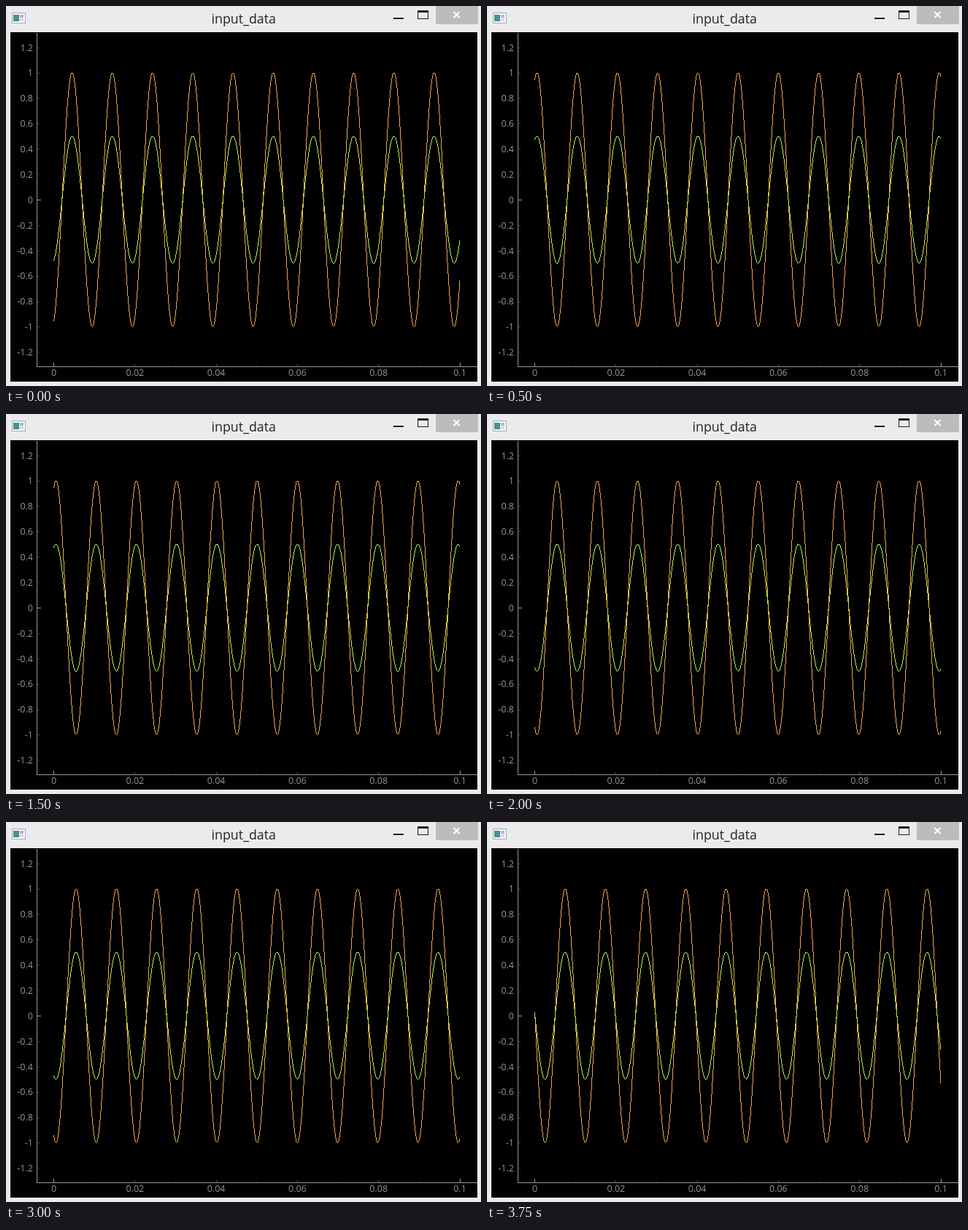
Recreate the animation shown at these times as an HTML page. Size 651 by 522 pixels, loop 4000 ms.

```html
<!DOCTYPE html>
<html lang="en">
<head>
<meta charset="utf-8">
<title>input_data</title>
<style>
  html, body { margin: 0; width: 100%; height: 100%; overflow: hidden; background: #ebebeb; }
  svg { display: block; width: 651px; height: 522px; }
  text { font-family: "Open Sans", "Noto Sans", sans-serif; }
  .title { font-size: 17.8px; fill: #222; text-anchor: middle; }
  #axes text { font-size: 12.5px; fill: #969696; }
  #axes line { stroke: #969696; }
  .wave { fill: none; stroke-width: 1; }
</style>
</head>
<body>
<svg viewBox="0 0 651 522">
  <defs>
    <linearGradient id="lime" gradientUnits="userSpaceOnUse" x1="0" y1="179" x2="0" y2="354">
      <stop offset="0" stop-color="#a8f25c"/>
      <stop offset=".35" stop-color="#cfe63c"/>
      <stop offset=".5" stop-color="#dbe034"/>
      <stop offset=".65" stop-color="#cfe63c"/>
      <stop offset="1" stop-color="#a8f25c"/>
    </linearGradient>
  </defs>
  <rect width="651" height="522" fill="#ebebeb"/>

  <g id="icon">
    <rect x="8.5" y="9.5" width="18" height="14" fill="#f6f8f9" stroke="#a3abb0"/>
    <rect x="10" y="12" width="8" height="9" fill="#4a908e"/>
    <rect x="19" y="12" width="5" height="4" fill="#a9bccb"/>
    <rect x="19" y="17" width="5" height="4" fill="#d3dae0"/>
  </g>
  <text class="title" x="325.7" y="24">input_data</text>
  <g id="buttons">
    <rect x="531" y="16" width="14" height="2" fill="#1c1c1c"/>
    <path d="M564 6h15v12h-15zM565 9v8h13v-8z" fill="#1c1c1c" fill-rule="evenodd"/>
    <rect x="589" width="58" height="25" fill="#bcbcbc"/>
    <path d="M613.5 8l8 8M621.5 8l-8 8" stroke="#fff" stroke-width="2"/>
  </g>

  <rect x="6" y="36" width="640" height="480" fill="#000"/>
  <g id="axes" shape-rendering="crispEdges"></g>
  <g shape-rendering="crispEdges">
    <path id="full" class="wave" stroke="#eaa650"/>
    <path id="half" class="wave" stroke="url(#lime)"/>
  </g>
</svg>
<script>
const $ = id => document.getElementById(id);
const X0 = 65.5, SPAN = 556.5, Y0 = 266.5, UNIT = 174.4;
const CYCLES = 10.095, LOOP = 4000, STEP = 250;

function add(tag, attrs, text) {
  const el = document.createElementNS($('axes').namespaceURI, tag);
  for (const key in attrs) el.setAttribute(key, attrs[key]);
  if (text) el.textContent = text;
  $('axes').append(el);
}

const line = (x1, y1, x2, y2, opacity = 1) =>
  add('line', { x1, y1, x2, y2, 'stroke-opacity': opacity });
const snap = v => Math.floor(v) + 0.5;

// Tick length and strength fall with the level: 0 is coarsest.
const tickLength = level => 5 / (1 + level / 2);
const tickAlpha = level => 1 / (level + 1);

function drawAxes() {
  line(42.5, 37, 42.5, 496);
  line(42, 495.5, 646, 495.5);
  for (let i = -6; i <= 6; i++) {
    const y = Y0 - i * UNIT / 5;
    const level = i === 0 ? 0 : i % 5 === 0 ? 1 : 2;
    line(43, snap(y), 43 + tickLength(level), snap(y), tickAlpha(level));
    add('text', { x: 37, y: y + 4.3, 'text-anchor': 'end' }, String(i / 5));
  }
  for (let i = 0; i <= 10; i++) {
    const x = X0 + i * SPAN / 10;
    const level = i % 10 === 0 ? 0 : i % 2 === 0 ? 1 : 2;
    line(snap(x), 495, snap(x), 495 - tickLength(level), tickAlpha(level));
    if (level < 2) add('text', { x, y: 508.3, 'text-anchor': 'middle' }, String(i / 100));
  }
}

// A hairline without smoothing: one vertical run of whole pixels per column.
function wave(amp, phase) {
  const rowAt = x => {
    const u = Math.min(1, Math.max(0, (x - X0) / SPAN));
    return Math.floor(Y0 - UNIT * amp * Math.cos(2 * Math.PI * (CYCLES * u - phase)));
  };
  let d = '';
  for (let x = Math.floor(X0); x < X0 + SPAN; x++) {
    const from = rowAt(x), to = rowAt(x + 1);
    d += `M${x + 0.5} ${from}V${to === from ? from + 1 : to}`;
  }
  return d;
}

// Each refresh shows a new block of samples, its phase held to tenths of a cycle.
const phaseAt = n => Math.floor(7.53 * (n - 2)) / 10 + 0.055;

let shown = -1;
function render(time) {
  const n = Math.floor((time % LOOP) / STEP);
  if (n === shown) return;
  shown = n;
  $('full').setAttribute('d', wave(1, phaseAt(n)));
  $('half').setAttribute('d', wave(0.5, phaseAt(n)));
}

drawAxes();
render(0);
let start;
requestAnimationFrame(function tick(now) {
  start ??= now;
  render(now - start);
  requestAnimationFrame(tick);
});
</script>
</body>
</html>
```
